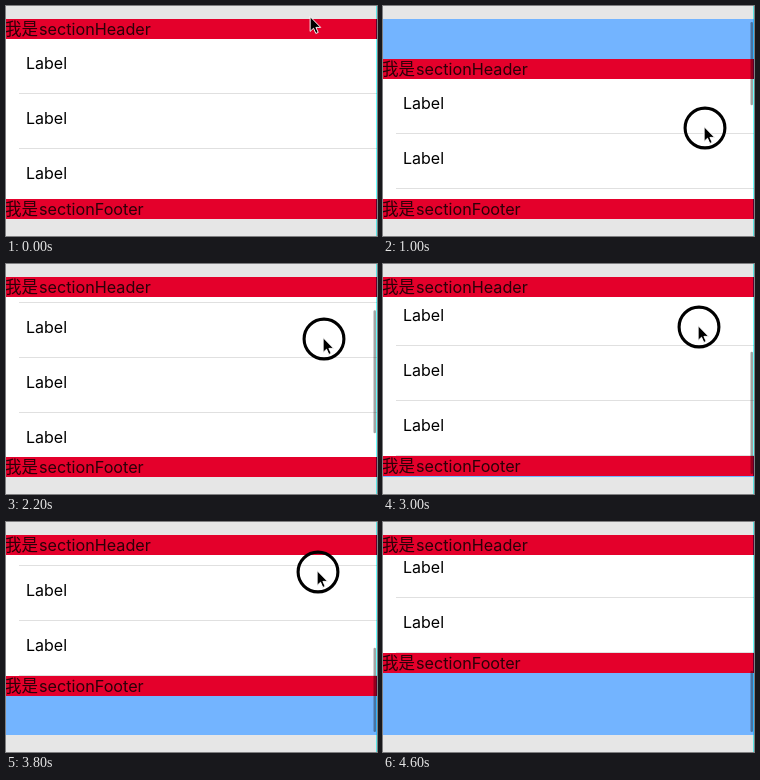
An HTML page that plays this animation: 371 by 230 pixels, repeating every 4.7 s.

```html
<!DOCTYPE html>
<html lang="en">
<head>
<meta charset="utf-8">
<title>Sticky section header and footer</title>
<style>
  html, body { margin: 0; width: 100%; height: 100%; overflow: hidden; background: #e6e6e6; }
  svg { display: block; }
  text { font: 16px Inter, Roboto, sans-serif; }
  .band { font-size: 16.2px; }
  .cjk { font: 16.5px "Noto Sans CJK SC", "Noto Sans CJK", sans-serif; }
  .edge { mix-blend-mode: multiply; }
</style>
</head>
<body>
<svg id="stage" width="371" height="230" viewBox="0 0 371 230">
  <rect width="371" height="230" fill="#e6e6e6"/>
  <svg id="table" y="13" width="371" height="200" overflow="hidden">
    <rect width="371" height="200" fill="#73b4ff"/>
    <g id="rows"><rect y="20" width="371" height="275" fill="#fff"/></g>
    <g id="header"></g>
    <g id="footer"></g>
    <rect id="bar" x="367.5" width="2.5" rx="1.25" fill="#000" fill-opacity=".36"/>
  </svg>
  <rect class="edge" x="370" width="1" height="230" fill="#6ff"/>
  <g id="pointer">
    <circle id="ring" r="19.9" fill="none" stroke="#000" stroke-width="3.1"/>
    <path transform="translate(-.4 -.4) scale(.95)" d="M-.5-1V14.5L3.1 11.2 5.5 16.7 8 15.6 5.6 10.3H10.6Z" fill="#000" stroke="#fff" stroke-width="1"/>
  </g>
</svg>
<script>
const LOOP = 4700, STEP = 100;
const VIEW = 200, BAND = 20, ROW = 55, ROWS = 5;
const CONTENT = 2 * BAND + ROW * ROWS, MAX_SCROLL = CONTENT - VIEW;
const BAR_INSET = 3, TRACK = VIEW - 2 * BAR_INSET, BAR = TRACK * VIEW / CONTENT;

// Pointer path: time, x, y
const path = [
  [0, 305, 12], [300, 318, 28], [600, 321, 76], [1000, 322, 122], [1100, 322, 122],
  [1300, 321, 127], [1700, 320, 132], [2200, 318, 75], [2300, 318, 66],
  [2500, 317, 127], [2900, 316, 71], [3000, 316, 63], [3100, 315, 58],
  [3400, 313, 142], [3800, 312, 50], [4000, 312, 36], [4100, 312, 36], [4600, 311, -23]
];

// Each drag scrolls from `base` once the pointer passes `grab`; dir 1 pulls up
const drags = [
  { from: 300, to: 1100, base: 0, grab: 31, dir: -1 },
  { from: 1600, to: 2300, base: 0, grab: 124, dir: 1 },
  { from: 2500, to: 3100, base: 58, grab: 122, dir: 1 },
  { from: 3400, to: LOOP, base: MAX_SCROLL, grab: 139, dir: 1 }
];

const $ = id => document.getElementById(id);
const move = (id, x, y) => $(id).setAttribute('transform', `translate(${x} ${y})`);
const clampScroll = s => Math.min(MAX_SCROLL, Math.max(0, s));

function pointerAt(t) {
  const i = path.findIndex(p => p[0] >= t);
  if (i < 0) return path[path.length - 1].slice(1);
  if (i === 0) return path[0].slice(1);
  const [a, b] = [path[i - 1], path[i]];
  const k = (t - a[0]) / (b[0] - a[0]);
  return [a[1] + (b[1] - a[1]) * k, a[2] + (b[2] - a[2]) * k];
}

function rubberBand(raw) {
  const over = raw - clampScroll(raw);
  return raw - over + Math.sign(over) * VIEW * (1 - 1 / (Math.abs(over) * 0.55 / VIEW + 1));
}

function scrollAt(t) {
  const drag = drags.filter(d => d.from <= t).pop();
  if (!drag) return 0;
  const y = pointerAt(Math.min(t, drag.to))[1];
  const travel = Math.max(0, drag.dir * (drag.grab - y));
  const scroll = rubberBand(drag.base + drag.dir * travel);
  if (t <= drag.to) return scroll;
  const rest = clampScroll(scroll), w = 0.013 * (t - drag.to);
  return rest + (scroll - rest) * (1 + w) * Math.exp(-w);
}

function band(id, label) {
  $(id).innerHTML = `<rect width="371" height="${BAND}" fill="#e4002b"/>
    <text class="band" x="-1" y="15.7" fill="#2c0008"><tspan class="cjk">我是</tspan><tspan x="33">${label}</tspan></text>`;
}

function build() {
  band('header', 'sectionHeader');
  band('footer', 'sectionFooter');
  for (let i = 0; i < ROWS; i++) {
    const y = BAND + ROW * i;
    $('rows').insertAdjacentHTML('beforeend',
      `<text x="20" y="${y + 29.5}">Label</text>
       <rect x="13" y="${y + ROW - 1}" width="358" height="1" fill="#e0e0e0"/>`);
  }
}

function drawBar(t, scroll) {
  const rest = clampScroll(scroll);
  const length = BAR - Math.abs(scroll - rest);
  const top = scroll > MAX_SCROLL ? VIEW - BAR_INSET - length
    : BAR_INSET + rest / MAX_SCROLL * (TRACK - BAR);
  $('bar').setAttribute('y', top);
  $('bar').setAttribute('height', length);
  const shown = t >= 400 && t < 1500 || t >= 1800;
  $('bar').setAttribute('opacity', shown ? 1 : t === 1500 ? 0.5 : 0);
}

function draw(t) {
  const scroll = Math.round(scrollAt(t));
  const [x, y] = pointerAt(t);
  move('rows', 0, -scroll);
  move('header', 0, Math.max(0, -scroll));
  move('footer', 0, Math.min(VIEW - BAND, CONTENT - BAND - scroll));
  drawBar(t, scroll);
  move('pointer', x, y);
  const pressed = drags.some(d => t >= d.from && t <= d.to);
  $('ring').setAttribute('visibility', pressed ? 'visible' : 'hidden');
}

build();
const start = performance.now();
function tick() {
  const t = (performance.now() - start) % LOOP;
  draw(Math.floor(t / STEP) * STEP);
  requestAnimationFrame(tick);
}
tick();
</script>
</body>
</html>
```
